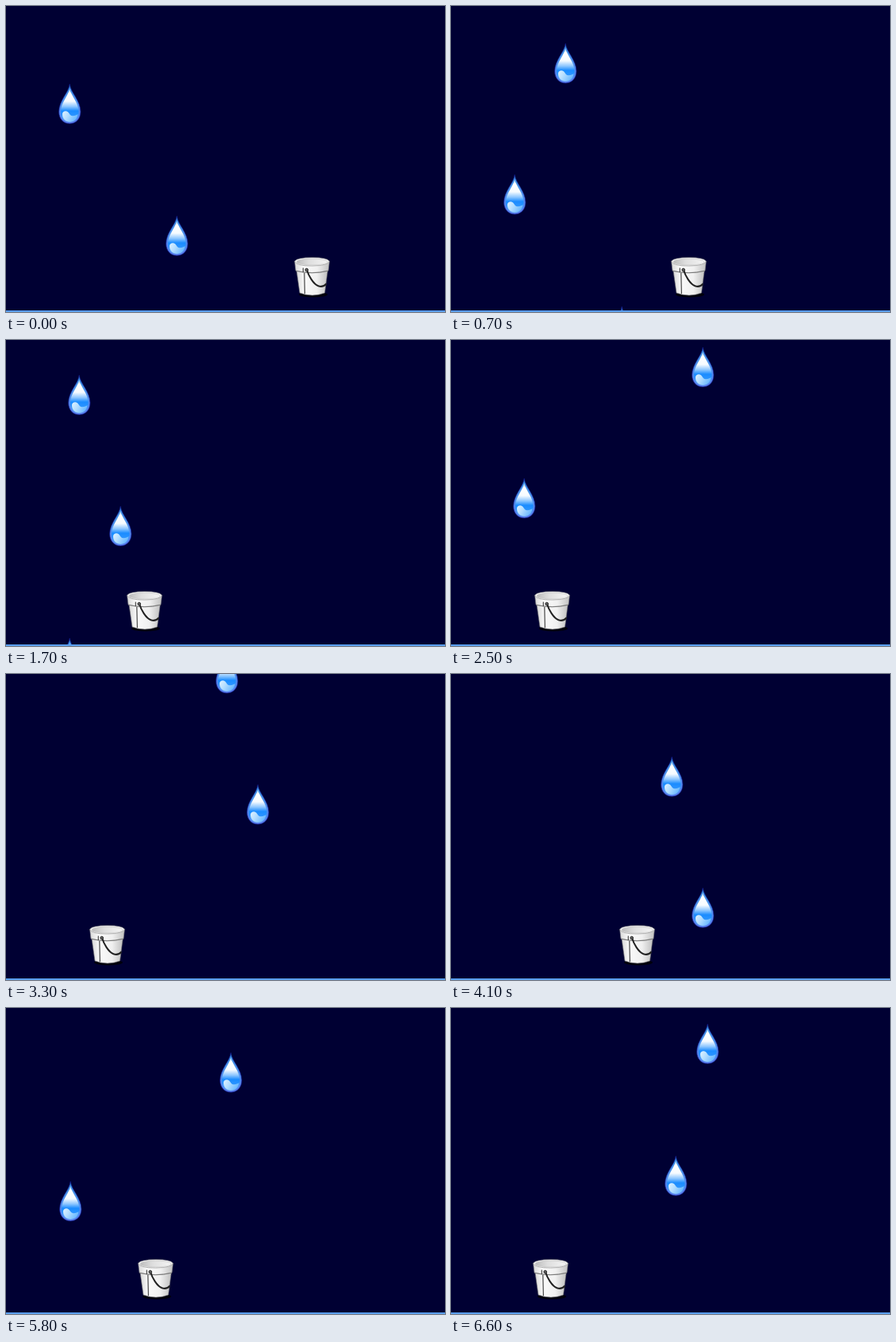
Animation of 553x385 px, one loop 6.7 s. Source, as an HTML page:

```html
<!DOCTYPE html>
<html>
<head>
<meta charset="utf-8">
<style>
html, body { margin: 0; width: 100%; height: 100%; overflow: hidden; background: #000033; }
svg { display: block; width: 553px; height: 385px; }
</style>
</head>
<body>
<svg id="stage" viewBox="0 0 553 385">
  <defs>
    <linearGradient id="edge" x2="0" y2="1">
      <stop offset="0" stop-color="#2f86d8"/><stop offset=".35" stop-color="#4a94ea"/>
      <stop offset="1" stop-color="#5a80ee"/>
    </linearGradient>
    <linearGradient id="water" x2="0" y2="1">
      <stop offset="0" stop-color="#8cc4f4"/><stop offset=".14" stop-color="#fff"/>
      <stop offset=".38" stop-color="#f6fbff"/><stop offset=".54" stop-color="#8cc6ff"/>
      <stop offset=".67" stop-color="#1a8cff"/><stop offset=".8" stop-color="#2a94ff"/>
      <stop offset="1" stop-color="#80c8ff"/>
    </linearGradient>
    <linearGradient id="swirl" x2="1" y2=".4">
      <stop offset="0" stop-color="#e2f3ff"/><stop offset=".45" stop-color="#b4deff"/>
      <stop offset="1" stop-color="#6cbaff"/>
    </linearGradient>
    <linearGradient id="side">
      <stop offset="0" stop-color="#d8d8d8"/><stop offset=".25" stop-color="#fafafa"/>
      <stop offset=".65" stop-color="#f0f0f0"/><stop offset="1" stop-color="#c0c0c0"/>
    </linearGradient>
    <linearGradient id="inside">
      <stop offset="0" stop-color="#bcbcbc"/><stop offset=".4" stop-color="#dedede"/>
      <stop offset="1" stop-color="#f4f4f4"/>
    </linearGradient>
    <g id="drop">
      <path d="M14.2 .3C15.5 11 28 21 28 35C28 44 22 50 14.2 50S.6 44 .6 35C.6 21 13 11 14.2 .3Z" fill="url(#edge)" stroke="#14188a" stroke-width=".7"/>
      <path d="M14.2 6C16 15 25.6 24 25.6 35C25.6 43 20.6 47.8 14.2 47.8S3 43 3 35C3 24 12.5 15 14.2 6Z" fill="url(#water)"/>
      <path d="M5 38C5 34.8 8 33.6 10.5 34.4C14 35.6 13.5 39.6 17.6 40.2C20.6 40.5 22.4 39.4 24.6 38C23.6 44 19.4 47.4 14.2 47.4C9.3 47.4 5 44 5 38Z" fill="url(#swirl)"/>
    </g>
    <g id="pail">
      <ellipse cx="24" cy="47" rx="18" ry="3.5" fill="#00000c"/>
      <path d="M3 17L7 45Q23 51 38.5 45L42.2 17Z" fill="url(#side)" stroke="#777" stroke-width=".6"/>
      <path d="M.6 5L2 17Q22 22 43 17L44.4 5Z" fill="url(#side)" stroke="#888" stroke-width=".6"/>
      <path d="M2 17.2Q22 22.4 43 17.2" fill="none" stroke="#777" stroke-width="1"/>
      <path d="M.7 5Q4 .6 22.5 .5T44.3 5Q43 10.8 22.5 11T.7 5Z" fill="#f4f4f4" stroke="#888" stroke-width=".6"/>
      <ellipse cx="22.5" cy="6" rx="19.5" ry="4" fill="url(#inside)" stroke="#bbb" stroke-width=".5"/>
      <path d="M11.3 13.5V19M12.8 20L13.4 46" fill="none" stroke="#444" stroke-width="1.2"/>
      <path d="M16 16C18 23 24 34 30.5 36.3C34.5 37.6 38 36.5 40.5 33.5" fill="none" stroke="#222" stroke-width="2"/>
      <circle cx="15.7" cy="16" r="1.8" fill="#666" stroke="#222"/>
    </g>
  </defs>
  <rect width="553" height="385" fill="#000033"/>
  <use id="bucket" href="#pail"/>
  <g id="rain"></g>
  <rect y="383" width="553" height="2" fill="#5a9eec"/>
</svg>
<script>
const LOOP = 6700, STEP = 100, FALL = 0.1625; // ms, ms, px per ms
// left edge, top at time zero, moment the bucket catches it
const drops = [
  [201, 264], [66, 98.4], [130, -67, 2050], [78, -232, 3065], [303, -396.8, 4390],
  [264, -562, 5095], [67, -724.8, 6260], [269, -886.5], [309, -1052.5]
].map(([x, y, caught = Infinity]) => ({ x, y, caught, node: addDrop() }));
// time, left edge
const path = [
  [0, 363], [80, 363], [700, 277], [1400, 179], [1600, 152], [2100, 152], [2450, 105],
  [3320, 105], [4470, 263], [5100, 263], [6250, 103], [LOOP, 103]
];
const bucket = document.getElementById('bucket');

function addDrop() {
  const node = document.createElementNS('http://www.w3.org/2000/svg', 'use');
  node.setAttribute('href', '#drop');
  return document.getElementById('rain').appendChild(node);
}

function bucketX(t) {
  const i = path.findIndex(p => p[0] > t);
  const [t0, x0] = path[i - 1], [t1, x1] = path[i];
  return x0 + (x1 - x0) * (t - t0) / (t1 - t0);
}

function place(node, x, y) {
  node.setAttribute('transform', `translate(${Math.round(x)} ${Math.round(y)})`);
}

function draw(now) {
  const t = Math.floor(now % LOOP / STEP) * STEP;
  place(bucket, bucketX(t), 316);
  for (const d of drops) {
    place(d.node, d.x, d.y + FALL * t);
    d.node.setAttribute('visibility', t < d.caught ? 'visible' : 'hidden');
  }
}

const start = performance.now();
function tick() {
  draw(performance.now() - start);
  requestAnimationFrame(tick);
}
tick();
</script>
</body>
</html>
```
